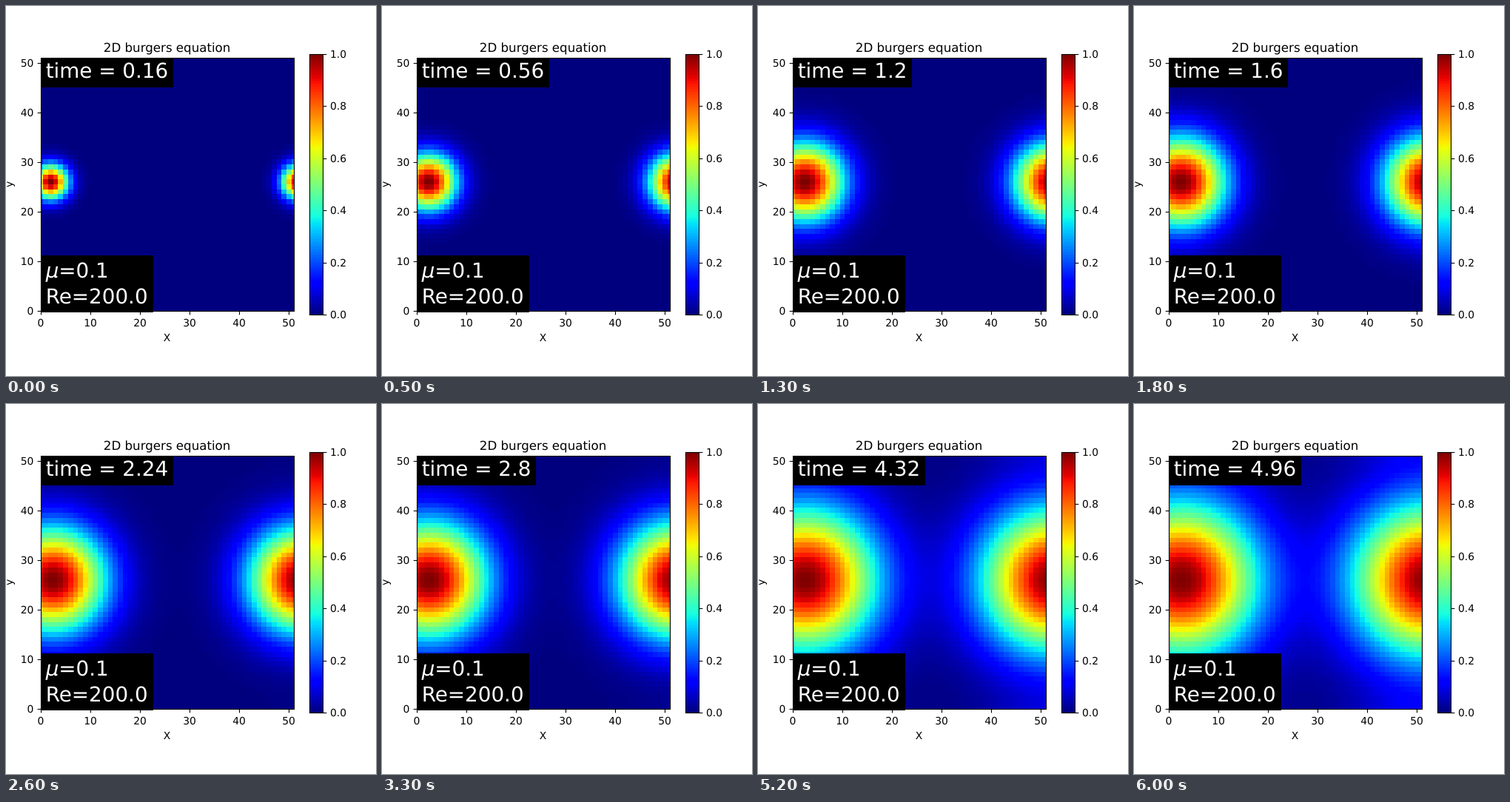
An HTML page with a canvas that plays this animation: 500x500 px, repeating every 6.1 s.

```html
<!DOCTYPE html>
<html lang="en">
<head>
<meta charset="utf-8">
<title>2D burgers equation</title>
<style>
  html, body { margin: 0; width: 100%; height: 100%; overflow: hidden; background: #fff; }
  canvas, svg { position: absolute; left: 0; top: 0; width: 500px; height: 500px; }
  text { font-family: "DejaVu Sans", sans-serif; font-size: 13.89px; text-rendering: geometricPrecision; }
  .line { fill: none; stroke: #000; stroke-width: 1.11; }
  .title { font-size: 16.67px; }
  .note { font-size: 27.78px; fill: #fff; }
  .mid { text-anchor: middle; }
  .end { text-anchor: end; }
  .mu { font-style: italic; }
</style>
</head>
<body>
<canvas id="field" width="500" height="500"></canvas>
<svg viewBox="0 0 500 500">
  <g id="axes">
    <rect class="line" x="47.5" y="70.5" width="342" height="342"/>
    <rect class="line" x="410.5" y="65.5" width="18" height="352"/>
    <text class="title mid" x="217.6" y="62">2D burgers equation</text>
    <text class="mid" x="217.6" y="452.5">X</text>
    <text class="mid" transform="translate(9.3 241) rotate(-90)">y</text>
  </g>
  <rect id="box" x="47" y="70" width="179" height="40"/>
  <text id="clock" class="note" x="53.7" y="97"></text>
  <rect x="47" y="337" width="152" height="77"/>
  <text class="note" x="53.7" y="367"><tspan class="mu">μ</tspan>=0.1</text>
  <text class="note" x="53.7" y="402">Re=200.0</text>
</svg>
<script>
const LEFT = 47, RIGHT = 389, TOP = 70, BOTTOM = 412;
const N = 51, CELL = (RIGHT - LEFT) / N, PERIOD = 50;
const STEP = 100, STEPS = 61;

const byId = id => document.getElementById(id);
const ctx = byId("field").getContext("2d");
const axes = byId("axes"), box = byId("box"), clock = byId("clock");
const clamp = (v, lo, hi) => Math.min(hi, Math.max(lo, v));

// Jet colour map in 256 levels
const ramp = (v, a, b, c, d, first, last) =>
  v < a ? first : v < b ? first + (1 - first) * (v - a) / (b - a) :
  v < c ? 1 : v < d ? 1 + (last - 1) * (v - c) / (d - c) : last;

const jet = Array.from({ length: 256 }, (_, i) => {
  const v = i / 255;
  const rgb = [
    ramp(v, 0.35, 0.66, 0.89, 1, 0, 0.5),
    ramp(v, 0.125, 0.375, 0.64, 0.91, 0, 0),
    ramp(v, 0, 0.11, 0.34, 0.65, 0.5, 0)
  ];
  return `rgb(${rgb.map(c => Math.floor(c * 255)).join()})`;
});
const colour = v => jet[clamp(Math.floor(v * 256), 0, 255)];

// Spreading bump, summed over its periodic copies
function profile(centre, variance) {
  const at = x => {
    let sum = 0;
    for (let k = -2; k <= 2; k++) sum += Math.exp(-((x - centre + k * PERIOD) ** 2) / (2 * variance));
    return sum;
  };
  const values = Array.from({ length: N + 1 }, (_, i) => at(i));
  const peak = Math.max(...values);
  return values.map(v => v / peak);
}

const edge = i => Math.round(clamp(i - 0.5, 0, N) * CELL);

function drawField(time) {
  const variance = 2.1 + 22.6 * time;
  const u = profile(2.55 - 0.08 / time, variance);
  const w = profile(26, variance);
  for (let j = 0; j <= N; j++) {
    const y0 = edge(j), y1 = edge(j + 1);
    for (let i = 0; i <= N; i++) {
      const x0 = edge(i), x1 = edge(i + 1);
      ctx.fillStyle = colour(u[i] * w[j]);
      ctx.fillRect(LEFT + x0, BOTTOM - y1, x1 - x0, y1 - y0);
    }
  }
}

function drawBar() {
  for (let y = 0; y < 352; y++) {
    ctx.fillStyle = colour(1 - (y + 0.5) / 352);
    ctx.fillRect(410, 65 + y, 18, 1);
  }
}

function add(tag, attrs, content = "") {
  const el = document.createElementNS("http://www.w3.org/2000/svg", tag);
  for (const key in attrs) el.setAttribute(key, attrs[key]);
  el.textContent = content;
  axes.append(el);
}
const tick = d => add("path", { class: "line", d });

function drawTicks() {
  for (let v = 0; v <= 50; v += 10) {
    const x = Math.round(LEFT + v * CELL) + 0.5;
    const y = Math.round(BOTTOM - v * CELL) + 0.5;
    tick(`M${x} 412.5v4.9`);
    tick(`M47.5 ${y}h-4.9`);
    add("text", { class: "mid", x: x - 0.5, y: 433 }, v);
    add("text", { class: "end", x: 37.3, y: y + 4.5 }, v);
  }
  for (let k = 0; k <= 5; k++) {
    const y = Math.round(417 - k * 70.4) + 0.5;
    tick(`M428.5 ${y}h4.9`);
    add("text", { x: 438, y: y + 4.5 }, (k / 5).toFixed(1));
  }
}

let shown = -1;
function render(now) {
  const n = Math.floor(now / STEP) % STEPS;
  if (n !== shown) {
    shown = n;
    const time = 0.16 + 0.08 * n;
    const label = time.toFixed(2).replace(/0$/, "");
    drawField(time);
    clock.textContent = `time = ${label}`;
    box.setAttribute("width", label.length > 3 ? 179 : 161);
  }
}

let start;
function loop(now) {
  start ??= now;
  render(now - start);
  requestAnimationFrame(loop);
}

drawBar();
drawTicks();
render(0);
requestAnimationFrame(loop);
</script>
</body>
</html>
```
